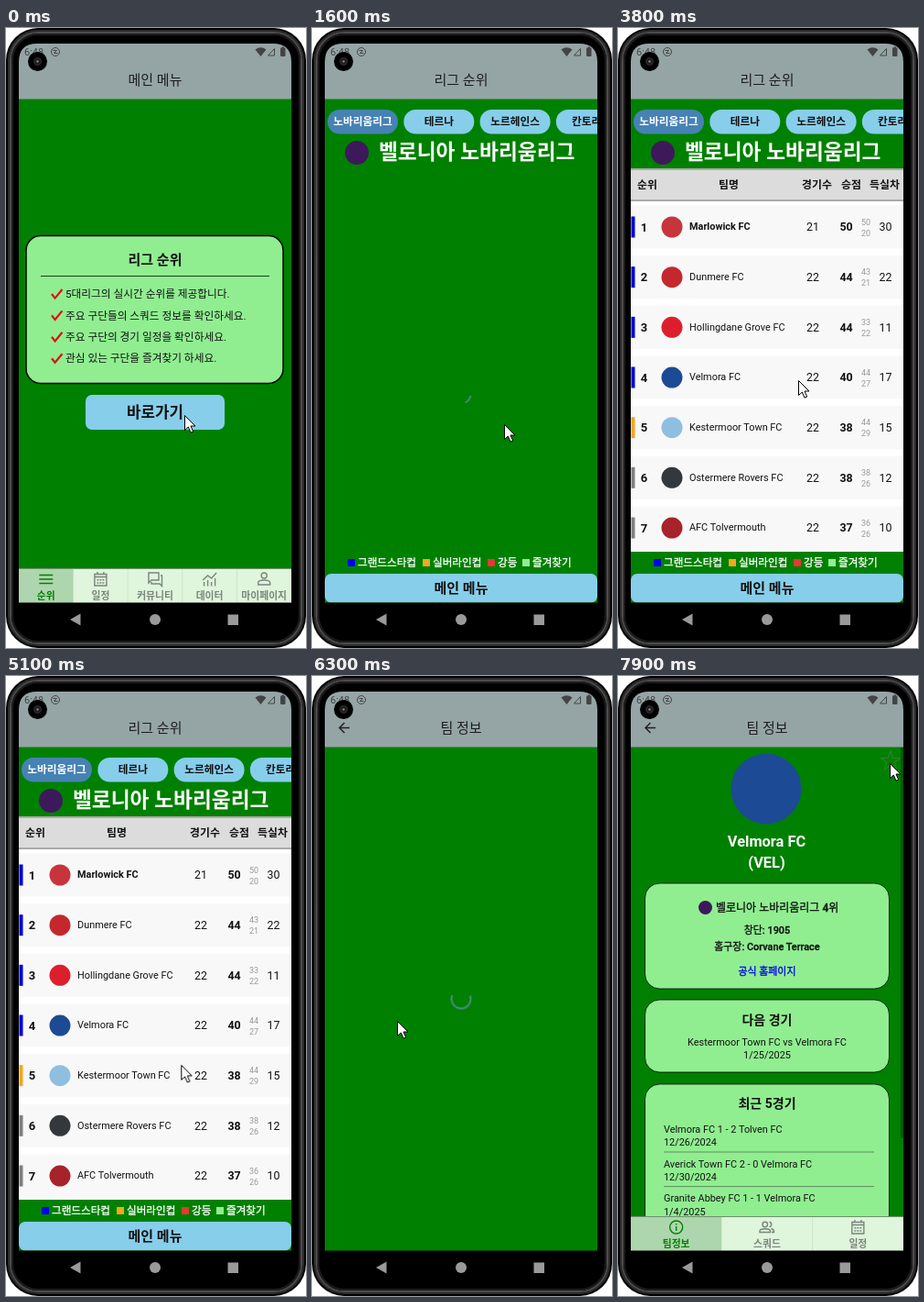
Animation of 328x676 px, one loop 8000 ms. Source, as an HTML page:

```html
<!DOCTYPE html>
<html lang="ko">
<head>
<meta charset="utf-8">
<title>League app demo</title>
<style>
html, body { margin: 0; width: 100%; height: 100%; overflow: hidden; background: #fff; }
svg { display: block; }
text { font-family: Roboto, "Noto Sans CJK KR", "Noto Sans CJK", sans-serif; text-anchor: middle; color: #111; fill: currentColor; }
.start { text-anchor: start; }
.medium { font-weight: 500; stroke: currentColor; stroke-width: .3; }
.bold { font-weight: 700; }
.white { color: #fff; }
.line { fill: none; stroke: currentColor; stroke-width: 1.4; }

.screen { transform-origin: 163px 322px; animation: 8s linear infinite; }
#menu { animation-name: menu; }
#league { animation-name: league; }
#team { animation-name: team; }
@keyframes menu {
  0%, 8.1% { opacity: 1; transform: scale(1); }
  8.7% { opacity: 1; transform: scale(1.07); }
  9.9% { opacity: 1; transform: scale(1.075); }
  10.5%, 100% { opacity: 0; transform: scale(1.075); }
}
@keyframes league {
  0%, 9.3% { opacity: 0; transform: scale(.95); }
  10.6%, 75.2% { opacity: 1; transform: scale(1); }
  76.2% { opacity: 1; transform: scale(1.073); }
  78%, 100% { opacity: 1; transform: scale(1.075); }
}
@keyframes team {
  0%, 76.7% { opacity: 0; transform: scale(.95); }
  78.2%, 100% { opacity: 1; transform: scale(1); }
}

/* Visible from --at for 4.4 s, then hidden until the next loop */
.show { animation: show 8s step-end calc(var(--at) - 8s) infinite; }
@keyframes show { 0% { visibility: visible; } 55%, 100% { visibility: hidden; } }

.go { animation: go 8s linear infinite; }
.picked { animation: picked 8s linear infinite; }
.star { animation: star 8s step-end infinite; }
@keyframes go { 0%, 4.6% { opacity: 1; } 5%, 100% { opacity: .4; } }
@keyframes picked { 0%, 73.5% { opacity: 1; } 75%, 100% { opacity: .4; } }
@keyframes star { 0% { opacity: 1; } 98.75%, 100% { opacity: .35; } }

.spin { animation: spin 1.6s linear infinite; }
.arc { fill: none; stroke: #4a8a80; stroke-width: 2; animation: arc 1.333333s linear var(--lag) infinite; }
@keyframes spin { to { transform: rotate(360deg); } }
@keyframes arc {
  0% { stroke-dasharray: 5 95; stroke-dashoffset: 0; }
  50% { stroke-dasharray: 72 28; stroke-dashoffset: 0; }
  100% { stroke-dasharray: 5 95; stroke-dashoffset: -67; }
}

#cursor { animation: cursor 8s linear infinite; }
@keyframes cursor {
  0%, 9% { transform: translate(195px, 422px); }
  18%, 21% { transform: translate(210px, 432px); }
  28%, 31% { transform: translate(216px, 432px); }
  47%, 54% { transform: translate(197px, 384px); }
  66% { transform: translate(190px, 433px); }
  73.5%, 80% { transform: translate(93px, 376px); }
  86.5% { transform: translate(114px, 398px); }
  97%, 100% { transform: translate(297px, 95px); }
}
</style>
</head>
<body>
<svg id="stage" width="328" height="676" viewBox="0 0 328 676"></svg>
<script>
const SKY = '#87ceeb', LIGHT = '#90ee90', GREEN = '#008000', PURPLE = '#3d195b';

// y is the visual middle of the line
const text = (x, y, size, str, cls = '', color = '') =>
  `<text x="${x}" y="${y + size * .36}" font-size="${size}" class="${cls}"${color && ` style="color:${color}"`}>${str}</text>`;
const box = (x, y, w, h, fill, r = 0, extra = '') =>
  `<rect x="${x}" y="${y}" width="${w}" height="${h}" rx="${r}" fill="${fill}" ${extra}/>`;
const dot = (x, y, r, fill, extra = '') => `<circle cx="${x}" cy="${y}" r="${r}" fill="${fill}" ${extra}/>`;
const rule = (x1, x2, y, color, w = 1) => `<path d="M${x1} ${y}H${x2}" stroke="${color}" stroke-width="${w}"/>`;
const card = (x, y, w, h, line) => box(x, y, w, h, LIGHT, 16, `stroke="#000" stroke-width="${line}"`);
const page = title => box(14, 17, 298, 610, GREEN) + box(14, 17, 298, 60.5, '#95a5a6') +
  text(163, 56.5, 15, title, '', '#1c1c1e');
const spinner = (x, y, turn, lag) =>
  `<g transform="translate(${x} ${y}) rotate(${turn})"><g class="spin"><circle r="10.5" pathLength="100" class="arc" style="--lag:${lag}ms"/></g></g>`;
const show = (at, body) => `<g class="show" style="--at:${at}s">${body}</g>`;

const icons = {
  list: 'M-7.5-4.5H7.5M-7.5 0H7.5M-7.5 4.5H7.5',
  calendar: 'M-6.5-5.5H6.5V7H-6.5ZM-6.5-2.5H6.5M-3.5-8V-5M3.5-8V-5M-4 .8H-2M-1 .8H1M2 .8H4M-4 4H-2M-1 4H1M2 4H4',
  chat: 'M-7-7H4V1H-4L-7 4ZM6-4H7.5V7.5L5 5H-4V3',
  chart: 'M-6 7.5V3M-2 7.5V1M2 7.5V3M6 7.5V-1M-7.5 1L-2-4 2-1 7.5-7',
  person: 'M3-4A3 3 0 1 1-3-4A3 3 0 1 1 3-4ZM-6.5 6V4C-6.5 0 6.5 0 6.5 4V6Z',
  info: 'M7 0A7 7 0 1 1-7 0A7 7 0 1 1 7 0ZM0-1V4M0-4V-2.5',
  people: 'M0.5-3A2.7 2.7 0 1 1-5-3A2.7 2.7 0 1 1 .5-3ZM-8 5.5V4C-8 1 3.5 1 3.5 4V5.5ZM2.5-5.7A2.7 2.7 0 0 1 2.5-.4M4.5 1.5C7 2 7.5 3 7.5 5.5H5'
};

const tabBar = tabs => {
  const w = 298 / tabs.length;
  return box(14, 589, 298, 38, '#dff5dc') + tabs.map(([icon, label], i) => {
    const x = 14 + w * (i + .5), color = i ? '#7b857b' : GREEN;
    return box(x - w / 2, 590, w, 37, i ? 'none' : '#aed6ae') +
      (i > 1 ? `<path d="M${x - w / 2} 590V627" stroke="#cfe4cc"/>` : '') +
      `<path class="line" transform="translate(${x} 601)" color="${color}" d="${icons[icon]}"/>` +
      text(x, 619, 10.8, label, 'bold', color);
  }).join('') + rule(14, 312, 589.5, '#6f8f6f');
};

const perks = ['5대리그의 실시간 순위를 제공합니다.', '주요 구단들의 스쿼드 정보를 확인하세요.',
  '주요 구단의 경기 일정을 확인하세요.', '관심 있는 구단을 즐겨찾기 하세요.'];

const menu = page('메인 메뉴') + card(22, 226.5, 281, 161, 1.5) +
  text(163, 252.5, 15, '리그 순위', 'bold') + rule(38, 288, 270.5, '#1d3d1d') +
  perks.map((s, i) => {
    const y = 290 + i * 23.4;
    return `<path d="M50 ${y}l3.6 4.6L61.5 ${y - 5}" fill="none" stroke="#e01010" stroke-width="2.2"/>` +
      text(65, y, 11.7, s, 'start');
  }).join('') +
  `<g class="go">${box(87, 400, 152, 38, SKY, 7)}${text(163, 418.5, 16.8, '바로가기', 'bold')}</g>` +
  tabBar([['list', '순위'], ['calendar', '일정'], ['chat', '커뮤니티'], ['chart', '데이터'], ['person', '마이페이지']]);

const LEAGUE = '벨로니아 노바리움리그';
const chips = ['노바리움리그', '테르나', '노르헤인스', '칸토라 A'];
const legend = [[39, '#0000f0', '그랜드스타컵'], [121, '#f5a623', '실버라인컵'], [192, '#e53935', '강등'], [230, LIGHT, '즐겨찾기']];

// name, crest, played, points, goals for, goals against
const clubs = [
  ['Marlowick FC', '#c8343c', 21, 50, 50, 20],
  ['Dunmere FC', '#c4282d', 22, 44, 43, 21],
  ['Hollingdane Grove FC', '#dd1f2d', 22, 44, 33, 22],
  ['Velmora FC', '#1d4a94', 22, 40, 44, 27],
  ['Kestermoor Town FC', '#8fbfe0', 22, 38, 44, 29],
  ['Ostermere Rovers FC', '#33383c', 22, 38, 38, 26],
  ['AFC Tolvermouth', '#a8222a', 22, 37, 36, 26]
];

const row = ([name, crest, played, points, scored, against], i) => {
  const y = 217 + i * 54.67, zone = i < 4 ? '#0000e0' : i < 5 ? '#f5a623' : '#808080';
  return `<g class="${i === 3 ? 'picked' : ''}">` + box(14, y - 23.5, 298, 47, '#f8f8f8') +
    box(14.5, y - 11.5, 4, 23, zone) + text(28.5, y, 13, i + 1, 'bold') +
    show(2.6 + i * .08, dot(59, y, 11.5, crest)) +
    text(78, y - .5, 10.9, name, i ? 'start' : 'start bold') + text(213, y, 12.4, played) +
    text(249.5, y, 12.4, points, 'bold') + text(271, y - 5.5, 9, scored, '', '#999') +
    text(271, y + 6.5, 9, against, '', '#999') + text(292.5, y, 12.4, scored - against) + '</g>';
};

const table = box(14, 153, 298, 418, '#fff') + box(14, 153, 298, 36, '#dcdcdc') +
  rule(14, 312, 154, '#aaa', 2) + rule(14, 312, 188, '#aaa', 2) +
  [[32, '순위'], [121, '팀명'], [217.5, '경기수'], [255, '승점'], [291.5, '득실차']]
    .map(([x, s]) => text(x, 171, 11.9, s, 'bold')).join('') + clubs.map(row).join('');

const league = page('리그 순위') +
  chips.map((s, i) => box(17 + i * 83.3, 89, 77, 26.5, i ? SKY : '#4682b4', 13) +
    text(55.5 + i * 83.3, 102, 11.7, s, i ? 'bold' : 'bold white')).join('') +
  dot(49, 136, 13, PURPLE) + text(73, 135, 22.7, LEAGUE, 'start bold white') +
  spinner(163, 399, 10, -1166) + show(2, table) +
  box(14, 571, 298, 24, GREEN) +
  legend.map(([x, c, s]) => box(x, 579, 8, 8, c) + text(x + 11, 583, 11.6, s, 'start medium white')).join('') +
  box(14, 595, 298, 31.5, SKY, 7) + text(163, 610.5, 15, '메인 메뉴', 'bold');

const games = [['Velmora FC 1 - 2 Tolven FC', '12/26/2024'], ['Averick Town FC 2 - 0 Velmora FC', '12/30/2024'],
  ['Granite Abbey FC 1 - 1 Velmora FC', '1/4/2025']];
const starPath = Array.from({ length: 10 }, (_, i) => {
  const a = i * Math.PI / 5, r = i % 2 ? 4.3 : 11;
  return `${298 + r * Math.sin(a)},${93 - r * Math.cos(a)}`;
}).join(' ');

const profile = dot(162, 123, 38.5, '#1d4a94') +
  `<polygon class="star" points="${starPath}" fill="none" stroke="#808080" stroke-width="1.2"/>` +
  text(162.5, 180.5, 16.4, 'Velmora FC', 'bold white') + text(162.5, 203, 16.4, '(VEL)', 'bold white') +
  card(29.5, 226, 267, 115, .8) + dot(95.5, 252.5, 7.5, PURPLE) +
  text(107, 253, 12, LEAGUE + ' 4위', 'start medium') + text(163, 277, 10.9, '창단: 1905', 'medium') +
  text(163, 295, 10.9, '홈구장: Corvane Terrace', 'medium') + text(163, 322, 10.9, '공식 홈페이지', 'medium', '#0000f0') +
  card(29.5, 353, 267, 79, .8) + text(163, 374.5, 14, '다음 경기', 'bold') +
  text(163, 399, 10.9, 'Kestermoor Town FC vs Velmora FC') + text(163, 413, 10.9, '1/25/2025') +
  card(29.5, 445, 267, 190, .8) + text(163, 466, 14, '최근 5경기', 'bold') +
  games.map(([s, date], i) => {
    const y = 494 + i * 37.6;
    return text(50, y, 10.9, s, 'start') + text(50, y + 14.5, 10.9, date, 'start') + rule(50, 280, y + 25, '#5f8f5f');
  }).join('') +
  box(309, 78, 3, 426, '#000', 0, 'opacity=".3"') +
  tabBar([['info', '팀정보'], ['people', '스쿼드'], ['calendar', '일정']]);

const team = page('팀 정보') +
  '<path d="M41 56.5H30M35.5 51L30 56.5 35.5 62" fill="none" stroke="#222" stroke-width="1.5"/>' +
  show(2.2, spinner(163, 352, 2.5, -929)) + show(6.6, profile);

const edge = (d, color, w) => box(d, d, 328 - 2 * d, 676 - 2 * d, 'none', 35 - d, `stroke="${color}" stroke-width="${w}"`);
const phone = box(0, 0, 328, 676, '#000', 35) + edge(3, '#2c2c2c', 2) + edge(5, '#4c4c4c', 2) + edge(7, '#1c1c1c', 2);

const status = text(20, 26, 11, '6:48', 'start', '#444') +
  '<g fill="none" stroke="#444"><circle cx="54" cy="26" r="4.5"/><path d="M51.5 24.5h4l-3 3h4"/></g>' +
  '<path d="M272.5 23.5Q278.5 19 284.5 23.5L278.5 31Z" fill="#444"/>' +
  '<path d="M286.5 30H293.5V22.5Z" fill="none" stroke="#444"/>' + box(300, 21.5, 5.5, 9.5, '#444', 1) + box(301.5, 20.5, 2.5, 2, '#444');
const camera = dot(34.5, 36.5, 10.5, '#000') + dot(34.5, 36.5, 4, '#1c1c1c', 'stroke="#333"') + dot(34.5, 36.5, 1.2, '#888');
const nav = '<path d="M70 645L81.5 638.5V651.5Z" fill="#9a9a9a"/>' + dot(163, 645, 6, '#9a9a9a') + box(242.5, 639.5, 11.5, 11.5, '#9a9a9a');

document.getElementById('stage').innerHTML =
  `<clipPath id="glass"><path d="M14 626.5V37Q14 17 34 17H292Q312 17 312 37V626.5Z"/></clipPath>` + phone +
  `<g clip-path="url(#glass)"><g id="league" class="screen">${league}</g><g id="menu" class="screen">${menu}</g>` +
  `<g id="team" class="screen">${team}</g>${status}</g>` + camera + nav +
  '<path id="cursor" d="M.5.5V16.5L4.3 13 7 19.2 9.7 18 7 12H12Z" fill="#fff" stroke="#000"/>';
</script>
</body>
</html>
```
